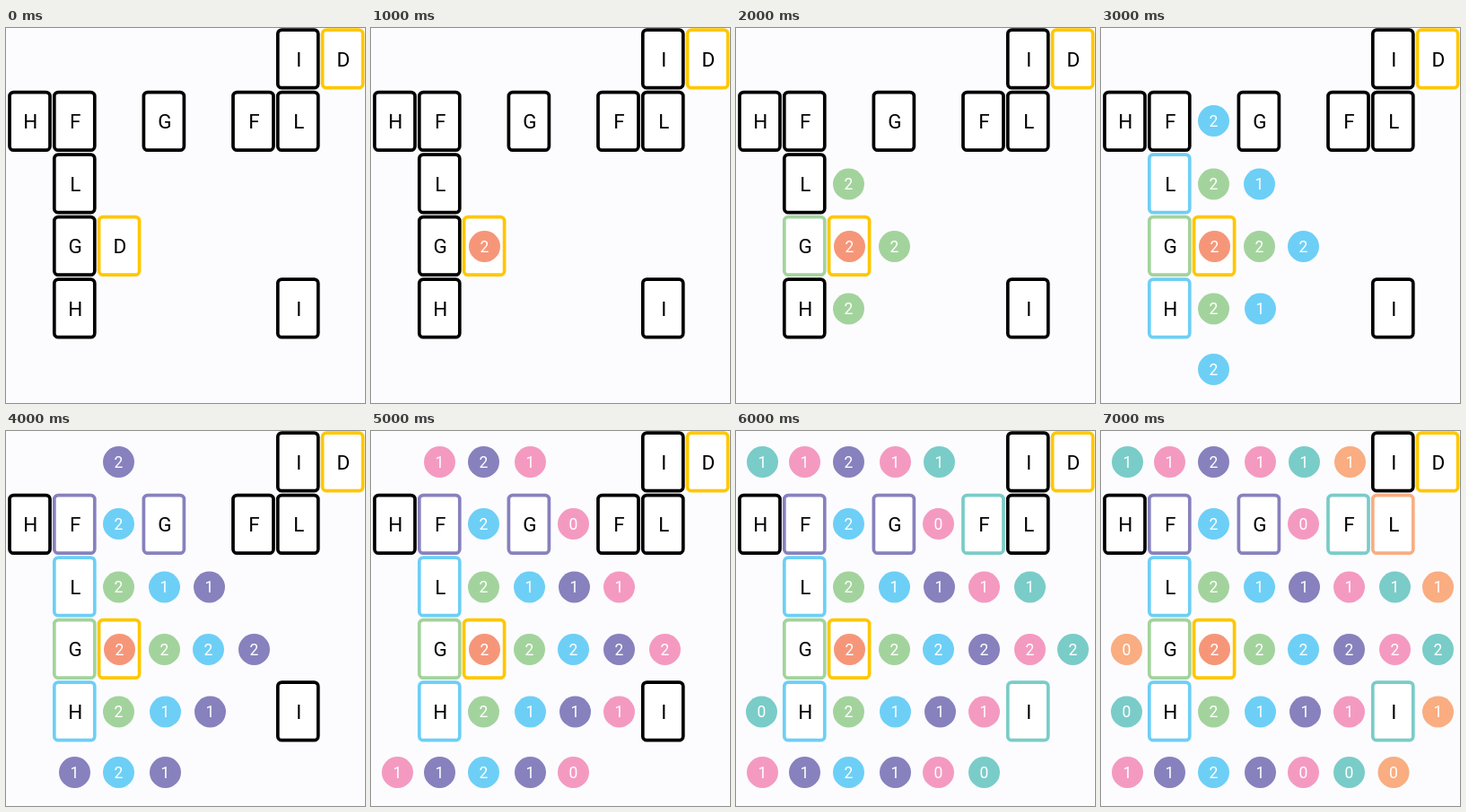
Write an HTML page that moves like this. It is 400 px wide and 418 px high and loops after 8000 ms.

```html
<!DOCTYPE html>
<html lang="en">
<head>
<meta charset="utf-8">
<title>Card search</title>
<style>
html, body { margin: 0; width: 100%; height: 100%; overflow: hidden; background: #fcfcff; }
svg { display: block; width: 400px; height: 418px; }
text { font-family: Roboto, sans-serif; text-anchor: middle; }
.card rect { fill: #fff; stroke-width: 3.7; }
.card text { font-size: 22.5px; fill: #000; }
.dot text { font-size: 17.5px; fill: #fff; }
</style>
</head>
<body>
<svg id="stage" viewBox="0 0 400 418"></svg>
<script>
const NS = 'http://www.w3.org/2000/svg';
const STEP = 1000, LOOP = 8000;
const COLORS = ['#000', '#f69679', '#a3d39c', '#6dcff6', '#8781bd', '#f49ac1', '#7accc8', '#f9ad81'];
const GOLD = '#ffc700';
const stage = document.getElementById('stage');

// letter, column, row, step at which the border takes its colour (0: never)
const CARDS = [
  ['I', 6, 0, 0], ['D', 7, 0, 0],
  ['H', 0, 1, 0], ['F', 1, 1, 4], ['G', 3, 1, 4], ['F', 5, 1, 6], ['L', 6, 1, 7],
  ['L', 1, 2, 3], ['G', 1, 3, 2], ['D', 2, 3, 1],
  ['H', 1, 4, 3], ['I', 6, 4, 6]
];

// per row: centre y, step of each cell, number in each cell, x centres
const ROWS = [
  [34.5, '654567..', '112111..', [29.5, 76.5, 125.5, 177.5, 226.5, 277.5]],
  [103.5, '..3.5...', '..2.0...', [125.5, 225.5]],
  [174, '..234567', '..211111', [125.5, 176.5, 226.5, 276.5, 327.5, 375.5]],
  [243.5, '7.123456', '0.222222', [28.5, 126.5, 176.5, 225.5, 276.5, 327.5, 375.5]],
  [313, '6.2345.7', '0.2111.1', [28.5, 125.5, 177.5, 227.5, 276.5, 375.5]],
  [380.5, '5434567.', '1121000.', [29.5, 76.5, 125.5, 177.5, 225.5, 276.5, 326]]
];

function add(parent, tag, attrs, text) {
  const el = document.createElementNS(NS, tag);
  for (const k in attrs) el.setAttribute(k, attrs[k]);
  if (text !== undefined) el.textContent = text;
  parent.appendChild(el);
  return el;
}

const cards = CARDS.map(([letter, col, row, step]) => {
  const g = add(stage, 'g', { class: 'card' });
  const x = 26.5 + 49.8 * col, y = 34.4 + 69.5 * row;
  const rect = add(g, 'rect', { x: x - 22.5, y: y - 32.3, width: 45, height: 64.6, rx: 4.5 });
  const label = add(g, 'text', { x: x + 0.9, y: y + 8.1 }, letter);
  return { letter, step, rect, label };
});

const dots = [];
for (const [y, steps, values, xs] of ROWS) {
  let n = 0;
  [...steps].forEach((s, i) => {
    if (s === '.') return;
    const x = xs[n++];
    const g = add(stage, 'g', { class: 'dot' });
    add(g, 'circle', { cx: x, cy: y, r: 17.5, fill: COLORS[s] });
    add(g, 'text', { x, y: y + 6.4 }, values[i]);
    dots.push({ step: +s, g });
  });
}

function draw(time) {
  const now = Math.floor((time % LOOP) / STEP);
  for (const c of cards) {
    const reached = c.step > 0 && now >= c.step;
    const goal = c.letter === 'D';
    c.rect.setAttribute('stroke', goal ? GOLD : COLORS[reached ? c.step : 0]);
    c.label.setAttribute('visibility', goal && reached ? 'hidden' : 'visible');
  }
  for (const d of dots) d.g.setAttribute('visibility', now >= d.step ? 'visible' : 'hidden');
}

const start = performance.now();
function tick() {
  draw(performance.now() - start);
  requestAnimationFrame(tick);
}
tick();
</script>
</body>
</html>
```
